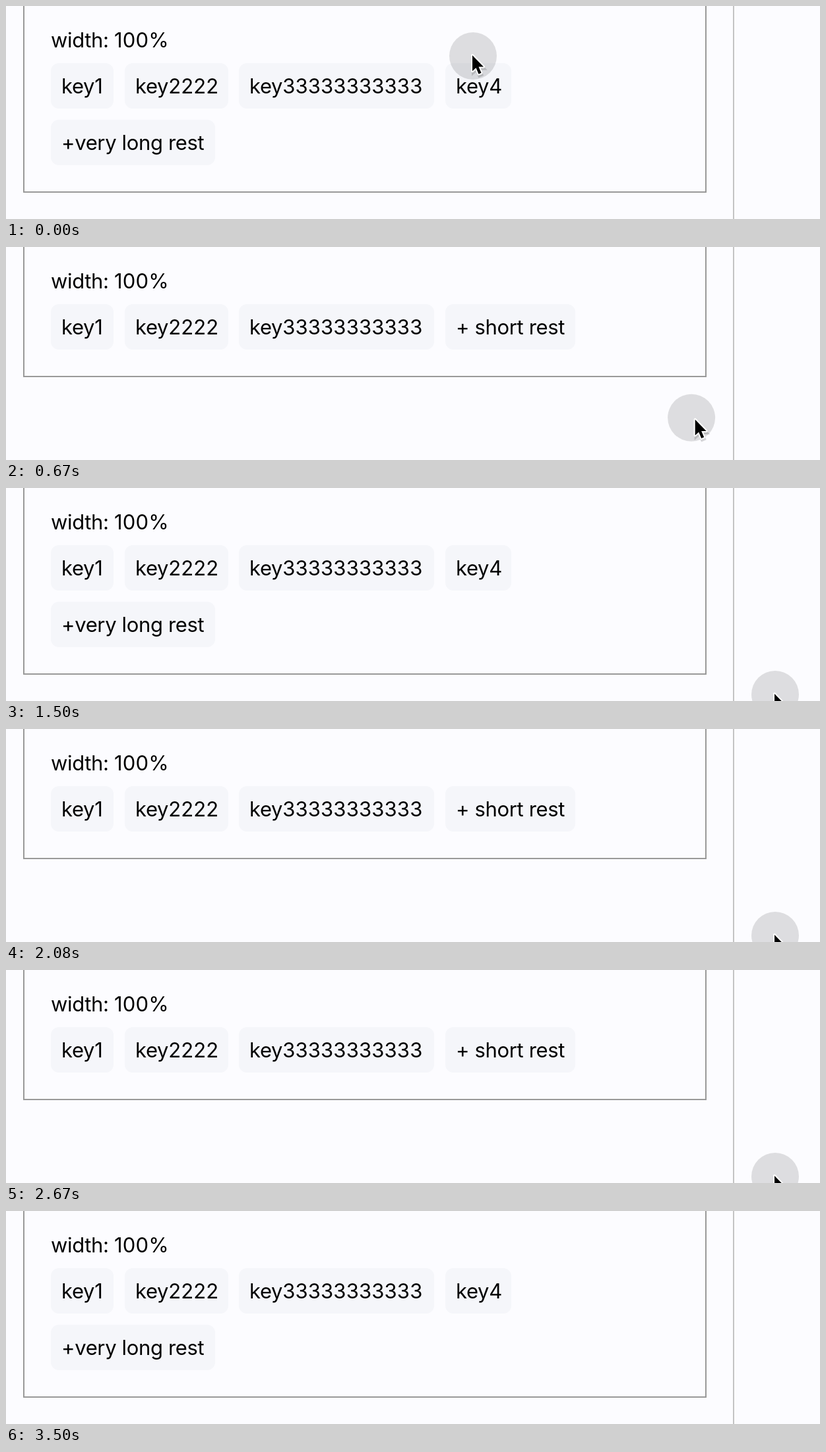
These frames come from a looping animation (1234 by 324 pixels, 3660 ms). An HTML page:

```html
<!DOCTYPE html>
<html lang="en">
<head>
<meta charset="utf-8">
<title>Tag overflow</title>
<style>
html, body { margin: 0; width: 100%; height: 100%; overflow: hidden; background: #fcfcff; }
svg { display: block; }
text { font: 400 31px Inter, "Open Sans", sans-serif; letter-spacing: -0.35px; fill: #000; white-space: pre; }
.num { letter-spacing: 0.15px; }
.chip rect { fill: #f5f6fa; }
</style>
</head>
<body>
<svg width="1234" height="324" viewBox="0 0 1234 324">
  <rect width="1234" height="324" fill="#fcfcff"/>
  <rect x="1102" width="2" height="324" fill="#c4c4c4"/>
  <rect id="panel" x="27" y="-10" width="1034" height="293" fill="none" stroke="#999" stroke-width="2"/>
  <g id="always"></g>
  <g id="long"></g>
  <g id="short"></g>
  <g id="mouse">
    <circle id="halo" r="36" fill="#000" fill-opacity="0.12"/>
    <g id="arrow">
      <path d="M1 3V27L6.5 22L10.5 31.5L14.5 29.8L10.5 20.5H18Z" opacity="0.15" stroke="#000" stroke-width="4"/>
      <path d="M0 0V24L5.5 19L9.5 28.5L13.5 26.8L9.5 17.5H17Z" stroke="#fff" stroke-width="4" stroke-linejoin="round" paint-order="stroke"/>
    </g>
  </g>
</svg>
<script>
const $ = id => document.getElementById(id);
const add = (group, markup) => $(group).insertAdjacentHTML('beforeend', markup);
const clamp = (v, lo, hi) => Math.min(hi, Math.max(lo, v));
const show = (id, on) => { $(id).style.display = on ? '' : 'none'; };

const LOOP = 3660, FPS = 12, LEAVE = 34;

function label(group, x, y, words) {
  const marked = words.replace(/\d+%?/, '<tspan class="num">$&</tspan>');
  add(group, `<text x="${x}" y="${y}">${marked}</text>`);
}

function chip(group, x, y, w, words) {
  add(group, `<g class="chip"><rect x="${x}" y="${y}" width="${w}" height="69" rx="12"/></g>`);
  label(group, x + 16, y + 46, words);
}

label('always', 68, 63, 'width: 100%');
chip('always', 68, 87, 95, 'key1');
chip('always', 180, 87, 157, 'key2222');
chip('always', 353, 87, 296, 'key' + '3'.repeat(11));
chip('long', 666, 87, 100, 'key4');
chip('long', 68, 173, 249, '+very long rest');
chip('short', 666, 87, 197, '+ short rest');

// The layout flips on every tick of a burst: [first tick, flips]
const bursts = [[4, 10], [15, 4], [20, 2], [25, 4], [32, 1], [35, 2], [38, 2], [42, 1]];
const flips = tick => bursts.reduce((sum, [first, n]) => sum + clamp(tick - first + 1, 0, n), 0);

// Pointer strokes: start tick, end tick, distance moved
const home = [708, 76];
const strokes = [[2, 9, 364, 202], [9, 13, 22, 2], [14, 18, 72, 34]];
const ease = u => 0.4 * u + 0.6 * u * u * (3 - 2 * u);

function pointer(tick) {
  return strokes.reduce(([x, y], [from, to, dx, dy]) => {
    const e = ease(clamp((tick - from) / (to - from), 0, 1));
    return [x + dx * e, y + dy * e];
  }, home);
}

function draw(ms) {
  const tick = Math.floor((ms % LOOP + 3.5) * FPS / 1000);
  const small = flips(tick) % 2 === 1;
  $('panel').setAttribute('height', small ? 207 : 293);
  show('long', !small);
  show('short', small);
  show('mouse', tick < LEAVE);

  // The arrow runs slightly ahead of its halo while moving
  const [x, y] = pointer(tick), [nx, ny] = pointer(tick + 1);
  const lead = pointer(tick - 1)[0] < x ? 0.2 : 0;
  $('halo').setAttribute('transform', `translate(${x} ${y})`);
  $('arrow').setAttribute('transform',
    `translate(${x - 1 + (nx - x) * lead} ${y - 1 + (ny - y) * lead})`);
}

const start = performance.now();
function run(now) {
  draw(Math.max(0, now - start));
  requestAnimationFrame(run);
}
draw(0);
requestAnimationFrame(run);
</script>
</body>
</html>
```
